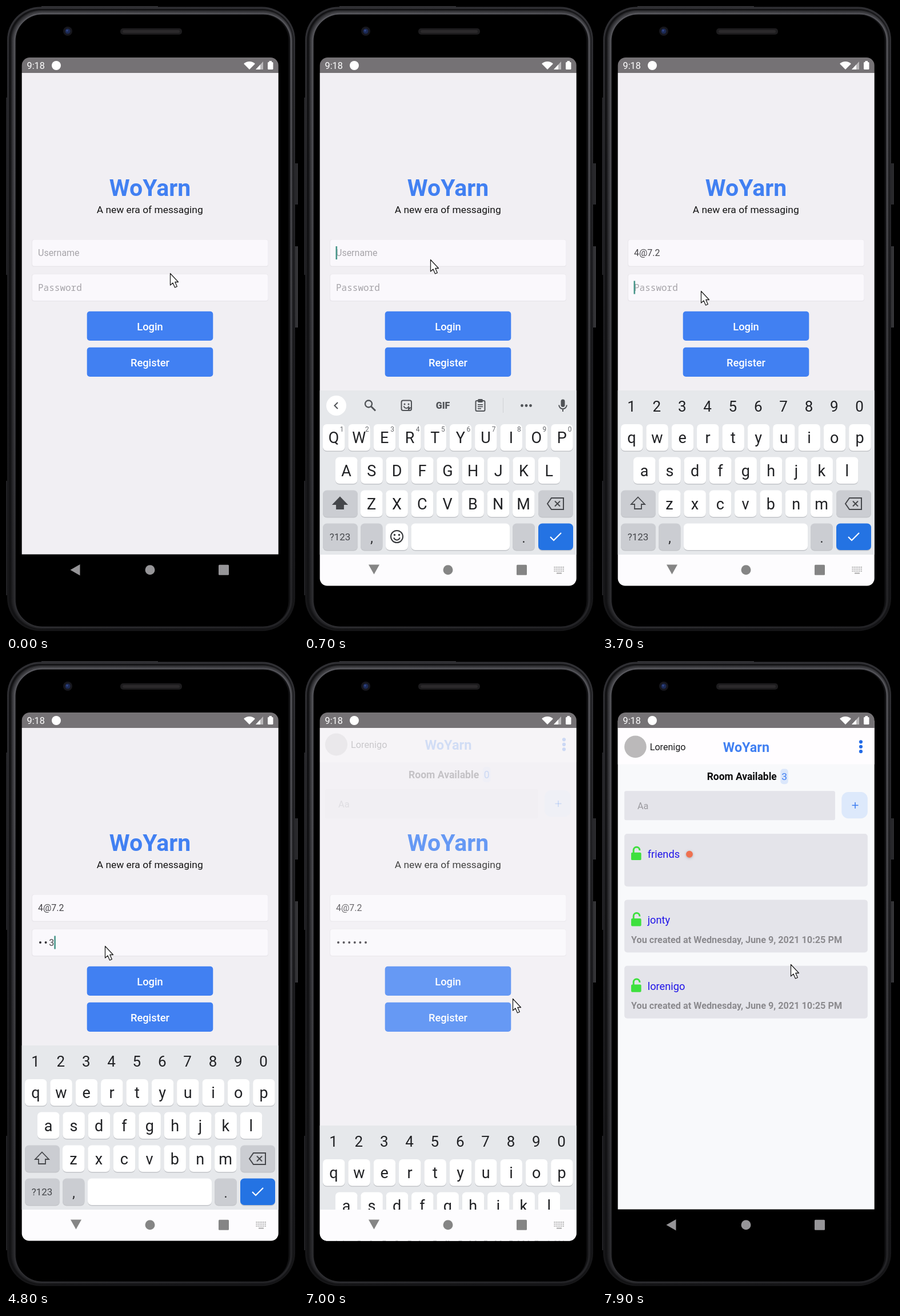
Recreate the animation shown at these times as an HTML page with a canvas. Size 511 by 1096 pixels, loop 8000 ms.

```html
<!DOCTYPE html>
<html lang="en">
<head>
<meta charset="utf-8">
<title>Chat sign-in</title>
<style>
html, body { margin: 0; width: 511px; height: 1096px; overflow: hidden; background: #000; }
canvas { display: block; }
</style>
</head>
<body>
<canvas id="stage" width="511" height="1096"></canvas>
<script>
const ctx = document.getElementById('stage').getContext('2d');
const LOOP = 8000, STEP = 100;
const APP = 'WoYarn', PERSON = 'Lorenigo', ACCOUNT = '4@7.2';
const SANS = 'Roboto, sans-serif', MONO = '"Noto Sans Mono", monospace';
const BLUE = '#4180f2', INK = '#202124', ICON = '#505357';

// Keyframe rows are [time, value...]
const CURSOR = [[0, 287, 467], [100, 250, 448], [200, 226, 436], [400, 226, 436], [600, 221, 443],
  [1200, 221, 443], [1500, 234, 446], [3300, 234, 446], [3600, 173, 498], [5200, 173, 498],
  [5600, 303, 550], [6000, 217, 572], [6400, 217, 572], [6900, 365, 590], [7400, 365, 590],
  [7800, 331, 534], [7900, 330, 530]];
const PRESS = [[6050, 1], [6200, .68], [6300, .6], [6500, 1]];
const USER_TYPING = [1300, 2000, 2300, 2800, 3000];
const PASS_TYPING = [4300, 4400, 4500, 5000, 5200, 5500];
const PASS_MASKED = 6900;
const CARET_OFF = [[900, 1200], [1700, 2000], [2300, 2400], [3400, 3700], [4500, 4800], [5900, 7100]];

const clamp = v => Math.max(0, Math.min(1, v));
const ease = v => 1 - (1 - clamp(v)) ** 3;
const count = (times, t) => times.filter(x => x <= t).length;

function track(keys, t) {
  const next = keys.findIndex(k => k[0] > t);
  if (next === 0) return keys[0].slice(1);
  if (next < 0) return keys[keys.length - 1].slice(1);
  const a = keys[next - 1], b = keys[next], p = (t - a[0]) / (b[0] - a[0]);
  return a.slice(1).map((v, i) => v + (b[i + 1] - v) * p);
}

function rect(x, y, w, h, color) {
  ctx.fillStyle = color;
  ctx.fillRect(x, y, w, h);
}
function box(x, y, w, h, r, color) {
  ctx.beginPath();
  ctx.roundRect(x, y, w, h, r);
  ctx.fillStyle = color;
  ctx.fill();
}
function frame(x, y, w, h, r, color, width) {
  ctx.beginPath();
  ctx.roundRect(x, y, w, h, r);
  ctx.strokeStyle = color;
  ctx.lineWidth = width;
  ctx.stroke();
}
function disc(x, y, r, color) {
  ctx.beginPath();
  ctx.arc(x, y, r, 0, 7);
  ctx.fillStyle = color;
  ctx.fill();
}
function shape(points, fill, stroke, width = 2) {
  ctx.beginPath();
  points.forEach(([x, y]) => ctx.lineTo(x, y));
  if (fill) {
    ctx.closePath();
    ctx.fillStyle = fill;
    ctx.fill();
  }
  if (stroke) {
    ctx.strokeStyle = stroke;
    ctx.lineWidth = width;
    ctx.stroke();
  }
}
function arc(x, y, r, from, to, color, width = 2) {
  ctx.beginPath();
  ctx.arc(x, y, r, from, to);
  ctx.strokeStyle = color;
  ctx.lineWidth = width;
  ctx.stroke();
}
function text(str, x, y, size, color, weight = 400, align = 'left', family = SANS) {
  ctx.font = `${weight} ${size}px ${family}`;
  ctx.textAlign = align;
  ctx.fillStyle = color;
  ctx.fillText(str, x, y);
}
function fade(x0, y0, x1, y1, ...colors) {
  const g = ctx.createLinearGradient(x0, y0, x1, y1);
  colors.forEach((c, i) => g.addColorStop(i / (colors.length - 1), c));
  return g;
}

function drawPhone() {
  rect(0, 0, 511, 1096, '#000');
  rect(506, 275, 5, 72, '#29292c');
  rect(506, 420, 5, 142, '#333336');
  rect(0, 830, 2, 200, '#202023');
  rect(0, 160, 2, 310, '#202023');
  rect(62, 0, 204, 3, '#2b2b2e');
  box(2, 1.5, 504, 1091, 58, fade(0, 0, 0, 1096, '#303034', '#1c1c1f', '#161618'));
  box(5, 5, 498, 1085, 55, '#121214');
  // Nested outlines shade the rim towards its lit inner edge
  const lit = fade(0, 0, 511, 1096, '#6c6c72', '#4b4b50', '#242427');
  for (let i = 0; i < 5; i++) {
    ctx.globalAlpha = .2 + .16 * i;
    frame(9.5 + i * 1.5, 8 + i * 1.4, 492 - i * 2.3, 1080 - i * 2.1, 52 - i, lit, 1.6);
  }
  ctx.globalAlpha = 1;
  box(17.5, 15.5, 477, 1069, 45, '#000');
  disc(108, 44, 8, '#17171d');
  disc(108, 44, 4.5, '#1c2a55');
  disc(107, 43, 1.8, '#33478a');
  box(200, 39, 108, 11, 5, '#1d1c1e');
  box(204, 42, 100, 5, 2.5, '#2b292b');
}

function drawStatus() {
  rect(27, 90, 450, 27, '#757275');
  text('9:18', 36.5, 109.5, 16.3, '#fff');
  disc(88, 104, 8, '#fff');
  ctx.beginPath();
  ctx.moveTo(426, 111);
  ctx.arc(426, 111, 14, Math.PI * 1.25, Math.PI * 1.75);
  ctx.fillStyle = '#fff';
  ctx.fill();
  shape([[437, 111], [450, 111], [450, 97]], '#bab8ba');
  shape([[437, 111], [445, 111], [445, 102.5]], '#fff');
  box(458, 98, 9.5, 13, 1.5, '#fff');
  rect(460.5, 96, 4.5, 3, '#fff');
}

function drawNav(open) {
  const c = open ? '#858585' : '#969598';
  shape(open ? [[113, 976.5], [132, 976.5], [122.5, 993.5]] : [[112.5, 985.7], [129.5, 976], [129.5, 995.4]], c);
  disc(252, 985.7, 8.5, c);
  box(372, 976.7, 18, 18, 1.5, c);
  if (!open) return;
  for (let row = 0; row < 3; row++)
    for (let i = 0; i < 6; i++) rect(437.5 + i * 3.1, 980 + row * 3.4, 1.9, 1.9, '#aaa');
  rect(442, 990.5, 9, 2, '#aaa');
}

function drawCaret(x, y, t) {
  if (t < 500 || CARET_OFF.some(([from, to]) => t >= from && t < to)) return;
  rect(x - .5, y, 2.6, 23, '#48968a');
}

function drawField(y) {
  box(45, y, 414, 48, 4, '#e9e7ec');
  box(46, y + .5, 412.5, 46, 4, '#faf8fc');
}

function drawButton(label, y, alpha) {
  ctx.globalAlpha *= alpha;
  box(141.7, y - .3, 220.6, 51.3, 5, BLUE);
  ctx.globalAlpha /= alpha;
  text(label, 252, y + 33, 18.3, '#fff', 500, 'center');
}

function drawLogin(t) {
  rect(27, 117, 450, 842, '#f1eff3');
  text(APP, 252, 332, 41, BLUE, 700, 'center');
  text('A new era of messaging', 251.7, 361.5, 17.4, '#151515', 400, 'center');
  drawField(408);
  drawField(468.5);

  const typed = ACCOUNT.slice(0, count(USER_TYPING, t));
  text(typed || 'Username', 56, 437, 16, typed ? '#454448' : '#a6a4a9');
  if (t < 3700) drawCaret(56 + (typed ? ctx.measureText(typed).width : 0), 420, t);

  const n = count(PASS_TYPING, t), masked = t >= PASS_MASKED ? n : n - 1, pitch = 9.6;
  if (!n) text('Password', 56, 497.5, 16, '#a6a4a9', 400, 'left', MONO);
  for (let i = 0; i < n; i++) {
    if (i < masked) disc(60 + i * pitch, 492, 2, '#333238');
    else text(i + 1, 56 + i * pitch, 497.5, 16, '#454448');
  }
  if (t >= 3700) drawCaret(56 + n * pitch, 480.5, t);

  drawButton('Login', 534, track(PRESS, t)[0]);
  drawButton('Register', 597, 1);
}

function drawKey(x, y, w, color, h = 46.5) {
  box(x, y + 1.5, w, h, 7, '#c3c5c9');
  box(x, y, w, h, 7, color);
}

function drawTools() {
  disc(56.5, 698.5, 17.5, '#fff');
  shape([[59, 693], [53.5, 698.5], [59, 704]], null, ICON);
  arc(113, 695.5, 6, 0, 7, ICON, 2.3);
  shape([[117.5, 700], [125, 707.5]], null, ICON, 2.8);
  frame(170.5, 689.5, 17.5, 17.5, 3, ICON, 2);
  disc(176, 696, 1.5, ICON);
  disc(183, 696, 1.5, ICON);
  arc(179, 698.5, 4.5, .2, Math.PI - .2, ICON, 1.8);
  shape([[182, 707.5], [182, 701.5], [188.5, 701.5]], ICON);
  text('GIF', 243, 703.5, 16, ICON, 900, 'center');
  frame(300.5, 690, 16, 18, 2, ICON, 2);
  box(304, 687, 9, 6, 2, ICON);
  for (const [y, w] of [[696, 9], [699.5, 9], [703, 6]]) rect(304, y, w, 1.7, ICON);
  rect(348, 685, 1, 26, '#cfd1d5');
  for (const x of [381.5, 389, 396.5]) disc(x, 698.5, 2.4, ICON);
  box(449.5, 687.5, 7, 13.5, 3.5, ICON);
  arc(453, 697.5, 6.8, 0, Math.PI, ICON);
  rect(452, 704, 2, 5, ICON);
}

function drawKeyboard(t) {
  const upper = t < 1300, numeric = t >= 3700, special = '#cbcdd2', pitch = 44.35;
  rect(27, 672, 450, 287, '#e6e8eb');
  if (numeric) [...'1234567890'].forEach((d, i) => text(d, 51.5 + i * pitch, 709, 26, INK, 400, 'center'));
  else drawTools();

  const rows = [['qwertyuiop', 33, 731], ['asdfghjkl', 55, 788.5], ['zxcvbnm', 99, 846.5]];
  for (const [letters, x0, y] of rows) {
    [...letters].forEach((letter, i) => {
      const x = x0 + i * pitch;
      drawKey(x, y, 38.5, '#fff');
      text(upper ? letter.toUpperCase() : letter, x + 19, y + 33, 27, INK, 400, 'center');
      if (y === 731 && !numeric) text((i + 1) % 10, x + 33, 743.5, 12, '#66686c', 400, 'center');
    });
  }

  drawKey(33, 846.5, 61, special);
  shape([[63, 858.5], [75, 871], [69, 871], [69, 879], [57, 879], [57, 871], [51, 871], [63, 858.5]],
    upper ? '#45474b' : special, '#45474b', 1.8);
  drawKey(410, 846.5, 61, special);
  shape([[426, 870], [433, 860], [454, 860], [454, 880], [433, 880], [426, 870]], special, '#45474b', 2);
  shape([[439, 865.5], [448, 874.5]], null, '#45474b');
  shape([[448, 865.5], [439, 874.5]], null, '#45474b');

  drawKey(33, 904.5, 61, special);
  text('?123', 63, 934, 17, '#45474b', 400, 'center');
  drawKey(99, 904.5, 38.5, special);
  text(',', 118.5, 938, 23, INK, 400, 'center');
  if (!numeric) {
    drawKey(143, 904.5, 39, '#fff');
    arc(162.5, 927.5, 10.5, 0, 7, '#35373a', 2);
    disc(158.5, 924.5, 1.7, '#35373a');
    disc(166.5, 924.5, 1.7, '#35373a');
    arc(162.5, 928, 5.5, .25, Math.PI - .25, '#35373a', 2);
  }
  const space = numeric ? 143 : 187.5;
  drawKey(space, 904.5, 360 - space, '#fff');
  drawKey(365, 904.5, 39, special);
  text('.', 384.5, 938, 23, INK, 400, 'center');
  drawKey(410, 904.5, 61, '#2473e3');
  shape([[431, 928], [437, 934], [450, 921]], null, '#fff', 2.2);
}

function drawLock(x, y) {
  const green = '#3ee03e';
  box(x, y + 11, 17.8, 13.5, 2, green);
  ctx.beginPath();
  ctx.moveTo(x + 4.2, y + 13);
  ctx.lineTo(x + 4.2, y + 7);
  ctx.arc(x + 9.6, y + 6.8, 5.4, Math.PI, .1);
  ctx.strokeStyle = green;
  ctx.lineWidth = 3;
  ctx.stroke();
}

function drawRoom(name, y, fresh) {
  box(37, y, 430, 93, 5, '#e4e4ea');
  drawLock(49, y + 22);
  text(name, 78, y + 42.5, 18.4, '#2015e8');
  if (fresh) {
    ctx.save();
    ctx.shadowColor = 'rgba(0,0,0,.25)';
    ctx.shadowBlur = 4;
    ctx.shadowOffsetY = 1;
    disc(152, y + 36, 6, '#ef7150');
    ctx.restore();
  } else {
    text('You created at Wednesday, June 9, 2021 10:25 PM', 49, y + 76.2, 16.4, '#8b8a8e', 700);
  }
}

function drawHome(t) {
  const scale = 1 - .01 * ease((t - 7500) / 300), loaded = t >= 7500;
  rect(27, 117, 450, 842, '#f8f9fb');
  ctx.save();
  ctx.translate(252.4, 538);
  ctx.scale(scale, scale);
  ctx.translate(-252.4, -538);
  rect(15, 100, 475, 77, '#fffdff');
  disc(56.5, 146, 19.5, '#bbb9ba');
  text(PERSON, 82, 152, 16.3, '#1b1b1d');
  text(APP, 252.4, 155, 23.6, BLUE, 700, 'center');
  for (const y of [137.3, 145.8, 154.3]) disc(455, y, 3.1, '#246be6');
  text('Room Available', 183, 205, 17.6, '#0b0b0c', 700);
  box(313, 185, 13.5, 27, 5, '#dbe7fb');
  text(loaded ? 3 : 0, 319.7, 205, 17.5, BLUE, 400, 'center');
  box(37, 224, 372.5, 51.5, 3, '#e4e4ea');
  text('Aa', 60, 256, 16.4, '#9c9ba0');
  box(421, 226, 46, 46.5, 12, '#dde9fb');
  rect(439.5, 248.6, 11, 1.6, BLUE);
  rect(444.2, 244, 1.6, 11, BLUE);
  if (loaded) {
    const names = ['friends', 'jonty', PERSON.toLowerCase()];
    names.forEach((name, i) => drawRoom(name, 299.7 + i * 116.5, i === 0));
  }
  ctx.restore();
}

function drawCursor(t) {
  const [x, y] = track(CURSOR, t);
  ctx.save();
  ctx.translate(x + .5, y + .5);
  ctx.lineJoin = 'round';
  shape([[0, 0], [0, 20.5], [4.5, 16.5], [8, 24.5], [11.8, 22.8], [8.3, 15], [14, 15], [0, 0]],
    '#fff', '#202020', 1.3);
  ctx.restore();
}

function draw(t) {
  drawPhone();
  const shown = ease((t - 350) / 300) * (1 - ease((t - 6950) / 250));
  ctx.save();
  ctx.beginPath();
  ctx.roundRect(27.7, 90, 449, shown > 0 ? 923.5 : 868.4, shown > 0 ? [14, 14, 13, 13] : [14, 14, 0, 0]);
  ctx.clip();
  if (t < 7200) drawLogin(t);
  if (t >= 7000) {
    ctx.globalAlpha = clamp((t - 6950) / 250);
    drawHome(t);
    ctx.globalAlpha = 1;
  }
  drawStatus();
  if (shown > 0) {
    ctx.save();
    ctx.translate(0, 287 * (1 - shown));
    drawKeyboard(t);
    ctx.restore();
    rect(27, 959, 450, 55, '#fdfcfe');
  }
  ctx.restore();
  drawNav(shown > 0);
  drawCursor(t);
}

const start = performance.now();
function tick() {
  const t = (performance.now() - start) % LOOP;
  draw(Math.floor(t / STEP) * STEP);
  requestAnimationFrame(tick);
}
tick();
</script>
</body>
</html>
```
